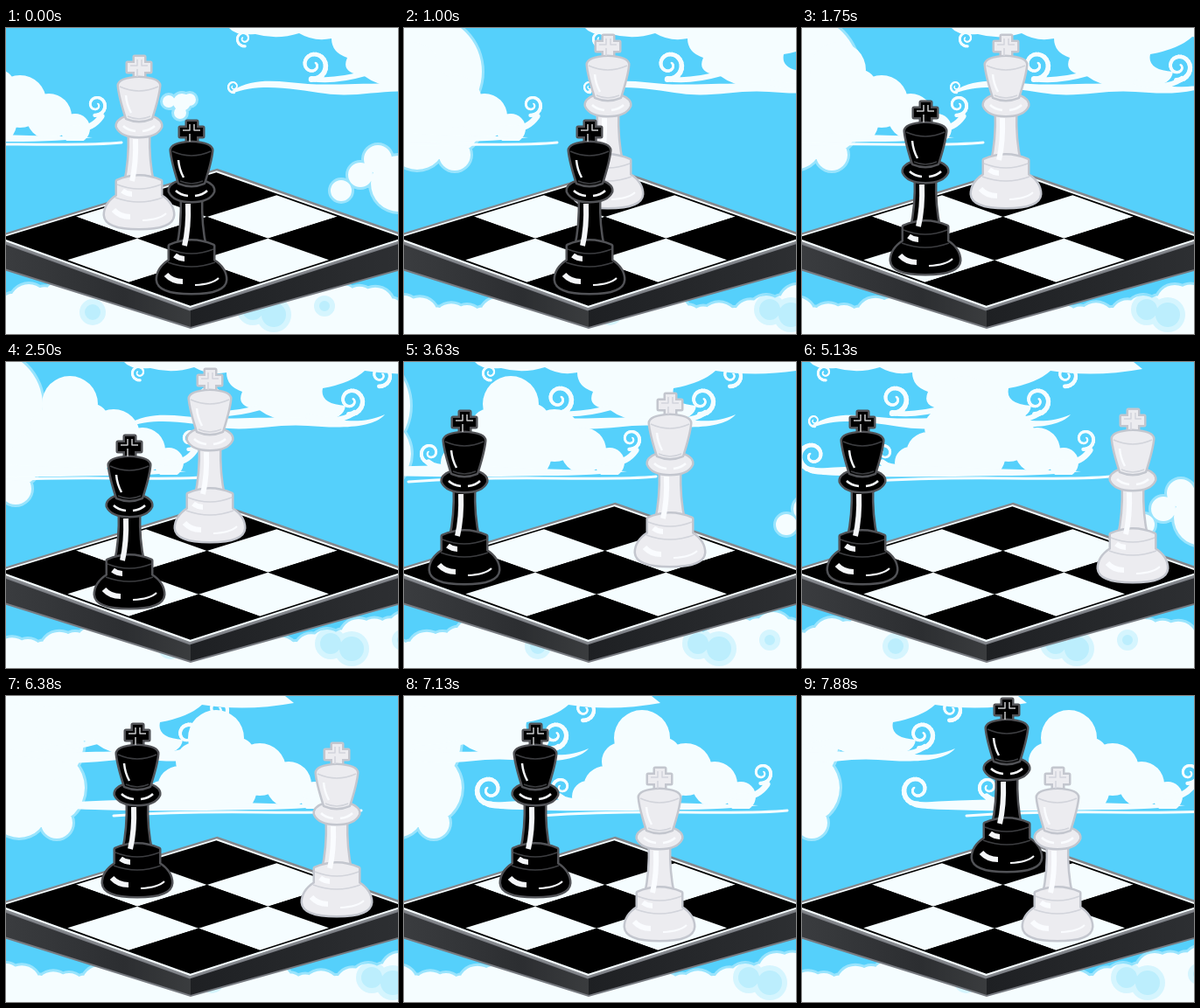
An HTML page with a canvas that plays this animation: 448 px wide and 350 px high, repeating every 8000 ms.

```html
<!DOCTYPE html>
<html lang="en">
<head>
<meta charset="utf-8">
<title>Kings in the sky</title>
<style>
html, body { margin: 0; width: 100%; height: 100%; overflow: hidden; background: #55d0fb; }
canvas { display: block; width: 448px; height: 350px; }
</style>
</head>
<body>
<canvas id="stage" width="448" height="350"></canvas>
<script>
const ctx = document.getElementById('stage').getContext('2d');
const LOOP = 8000, STEP = 125, SKY = '#55d0fb', CLOUD = '#f5fdff';

function poly(points, fill, stroke, width) {
  ctx.beginPath();
  points.forEach(p => ctx.lineTo(p[0], p[1]));
  ctx.closePath();
  if (fill) { ctx.fillStyle = fill; ctx.fill(); }
  if (stroke) { ctx.strokeStyle = stroke; ctx.lineWidth = width; ctx.stroke(); }
}

function line(d, color, width) {
  ctx.strokeStyle = color;
  ctx.lineWidth = width;
  ctx.stroke(new Path2D(d));
}

function discs(list, color, grow = 0) {
  ctx.fillStyle = color;
  ctx.beginPath();
  for (const [x, y, r] of list) {
    ctx.moveTo(x + r + grow, y);
    ctx.arc(x, y, r + grow, 0, 7);
  }
  ctx.fill();
}

function shifted(dx, paint) {
  ctx.save();
  ctx.translate(Math.round(dx), 0);
  paint();
  ctx.restore();
}

// Tapering spiral; flip mirrors it
function swirl(x, y, r, flip = 1) {
  ctx.strokeStyle = CLOUD;
  for (let i = 0; i < 32; i++) {
    const at = k => {
      const a = 1.7 - k * 0.27, d = r * (1 - k / 40);
      return [x + flip * d * Math.cos(a), y + d * Math.sin(a)];
    };
    ctx.lineWidth = r * 0.36 * (1 - i / 50);
    ctx.beginPath();
    ctx.moveTo(...at(i));
    ctx.lineTo(...at(i + 1));
    ctx.stroke();
  }
}

const haze = [[25, 50, 64], [48, 105, 42], [15, 130, 32], [58, 145, 18],
  [561, 150, 16], [541, 168, 14], [519, 186, 12], [585, 178, 32]];
const lowHaze = Array.from({ length: 36 }, (_, i) => {
  const x = i * 18;
  return [x, 322 - 14 * Math.cos((x - 210) / 46), 18 + 4 * Math.sin(i * 2.3)];
});
const lowFill = lowHaze.map(([x, y]) => [x, y + 24, 22]);
const tint = [[235, 325, 15], [418, 322, 18], [442, 328, 20], [500, 318, 12]];

function drawHaze(t) {
  const phase = (t + 4875) % 5375;
  shifted(15 - phase * 0.031, () => {
    const all = [...haze, ...lowHaze, ...lowFill];
    if (phase > 4500) all.push([322, 84, 7], [337, 85, 10], [346, 82, 7], [335, 97, 7]);
    discs(all, 'rgba(235,250,255,.45)', 3);
    discs(all, CLOUD);
    discs(tint, 'rgba(85,208,251,.2)');
    discs(tint, 'rgba(85,208,251,.2)', -6);
  });
}

const heap = [[122, 48, 32], [98, 75, 22], [80, 105, 25], [125, 100, 45], [172, 84, 30],
  [205, 101, 26], [235, 115, 17], [60, 115, 18], [148, 66, 18]];

function drawHeap(t) {
  shifted((t - 3630) * 0.043, () => {
    ctx.save();
    ctx.beginPath();
    ctx.rect(-200, 0, 600, 129);
    ctx.clip();
    discs(heap, CLOUD);
    ctx.restore();
    swirl(259, 88, 12);
    swirl(30, 104, 12, -1);
    swirl(-52, 107, 17, -1);
    line('M225 114 Q252 120 265 101 M60 121 Q35 122 28 115 M60 124 Q-30 128 -52 124', CLOUD, 7);
    ctx.fillStyle = CLOUD;
    ctx.fill(new Path2D('M-50 122 Q40 115 150 122 L255 125 Q220 130 160 130 Q40 133 -40 129Z'));
    line('M5 137 Q80 132 170 133 T288 131', CLOUD, 3);
  });
}

function drawWisps(t) {
  shifted(-t * 0.048, () => {
    ctx.fillStyle = CLOUD;
    ctx.fill(new Path2D('M255 0 Q262 9 285 7 Q310 14 335 6 Q352 16 372 12 Q372 28 390 34 Q382 52 408 54' +
      ' Q435 74 470 64 Q505 70 508 50 Q478 48 482 30 Q515 24 530 10 Q580 18 635 8 L625 0Z'));
    ctx.fill(new Path2D('M258 72 C285 55 315 62 345 64 S420 62 465 64 S525 72 553 60' +
      ' C540 76 500 76 465 73 S400 80 365 75 S290 62 258 75Z'));
    swirl(351, 42, 17);
    swirl(394, 22, 12);
    swirl(514, 44, 16);
    swirl(548, 15, 13);
    swirl(272, 12, 9, -1);
    swirl(260, 67, 7, -1);
    line('M349 58 Q375 62 410 52 M465 62 Q500 72 518 58', CLOUD, 6);
  });
}

const top0 = [240, 167], right0 = [448, 240], bottom0 = [211, 316], left0 = [0, 240];
const mix = (a, b, k) => [a[0] + (b[0] - a[0]) * k, a[1] + (b[1] - a[1]) * k];
const grid = (u, v) => mix(mix(top0, right0, u / 3), mix(left0, bottom0, u / 3), v / 3);
const rim = k => [top0, right0, bottom0, left0].map(p => mix([224, 240], p, k));

function drawBoard() {
  const [, right, bottom, left] = rim(1.085);
  const foot = [211, 343];
  const shade = ctx.createLinearGradient(0, 0, 448, 0);
  [[0, '#3a3c3f'], [0.3, '#2c2e31'], [0.47, '#3a3c3e'], [0.471, '#1e2023'], [1, '#2d2f32']]
    .forEach(s => shade.addColorStop(...s));
  poly([left, bottom, right, [466, 272], foot, [-18, 271]], shade, '#777a80', 2);
  poly(rim(1.085), '#85888d');
  poly(rim(1.052), CLOUD);
  poly(rim(1.024), '#000');
  for (let u = 0; u < 3; u++)
    for (let v = 0; v < 3; v++)
      poly([grid(u, v), grid(u + 1, v), grid(u + 1, v + 1), grid(u, v + 1)], (u + v) % 2 ? CLOUD : '#000');
}

const parts = [
  'M-5 28V18H-13V8H-5V1H6V8H13V18H6V28Z',
  'M-11 88 Q-10 120 -16 146 H16 Q10 120 11 88Z',
  'M-25 143 Q0 132 25 143 V160 Q39 169 39 182 Q38 197 0 197 Q-38 197 -39 182 Q-39 169 -25 160Z',
  'M-15 70 Q-26 74 -25 81 Q-20 92 0 92 Q20 92 25 81 Q26 74 15 70Z',
  'M-23 34 Q-23 26 0 25 Q23 26 23 34 Q22 46 14 71 Q0 77 -14 71 Q-22 46 -23 34Z'
].map(d => new Path2D(d));

const styles = {
  white: { fill: '#ececf0', edge: '#c3c6ce', seam: '#d2d4db', shine: '#fafcff' },
  black: { fill: '#000', edge: '#515256', seam: '#3c3d40', shine: '#f4f6f8' }
};

function drawKing({ x, y, style }) {
  const { fill, edge, seam, shine } = styles[style];
  ctx.save();
  ctx.translate(Math.round(x), Math.round(y) - 198);
  ctx.lineJoin = 'round';
  for (const p of parts) {
    ctx.lineWidth = 5;
    ctx.strokeStyle = edge;
    ctx.stroke(p);
    ctx.fillStyle = fill;
    ctx.fill(p);
  }
  line('M-22 35 Q0 45 22 35 M-13 69 Q0 75 13 69 M-25 147 Q0 157 25 147 M-27 162 Q0 172 27 162', seam, 1.5);
  line('M-10 11H-2V4 M3 4V11H10 M-2 15V24', style === 'black' ? '#c9cacc' : seam, 1.5);
  line('M-15 45 Q-14 56 -9 65 M-18 80 Q-13 85 -4 86 M4 86 Q13 85 18 80', shine, 2.5);
  line('M-4 95 Q-3 122 -8 143 M-19 154 Q-14 158 -8 158 M-29 176 Q-22 184 -10 184', shine, 6);
  line('M4 188 Q24 187 31 180', shine, 2);
  ctx.restore();
}

const routes = {
  white: { start: 500, stops: [[152, 230], [233, 206], [304, 234], [378, 252], [292, 280]] },
  black: { start: 1125, stops: [[212, 304], [141, 282], [69, 254], [150, 230], [234, 201]] }
};

// Each king slides one square every two seconds
function place(style, t) {
  const { start, stops } = routes[style];
  const since = Math.max(0, t - start), leg = Math.min(3, Math.floor(since / 2000));
  const k = Math.min(1, (since - leg * 2000) / 500);
  const [x, y] = mix(stops[leg], stops[leg + 1], k * k * (3 - 2 * k));
  return { x, y, style };
}

function draw(now) {
  const t = Math.floor((now % LOOP) / STEP) * STEP;
  ctx.fillStyle = SKY;
  ctx.fillRect(0, 0, 448, 350);
  ctx.lineCap = 'round';
  drawHaze(t);
  drawWisps(t);
  drawHeap(t);
  ctx.lineCap = 'butt';
  drawBoard();
  [place('white', t), place('black', t)].sort((a, b) => a.y - b.y).forEach(drawKing);
}

const begin = performance.now();
function tick() {
  draw(performance.now() - begin);
  requestAnimationFrame(tick);
}
tick();
</script>
</body>
</html>
```
